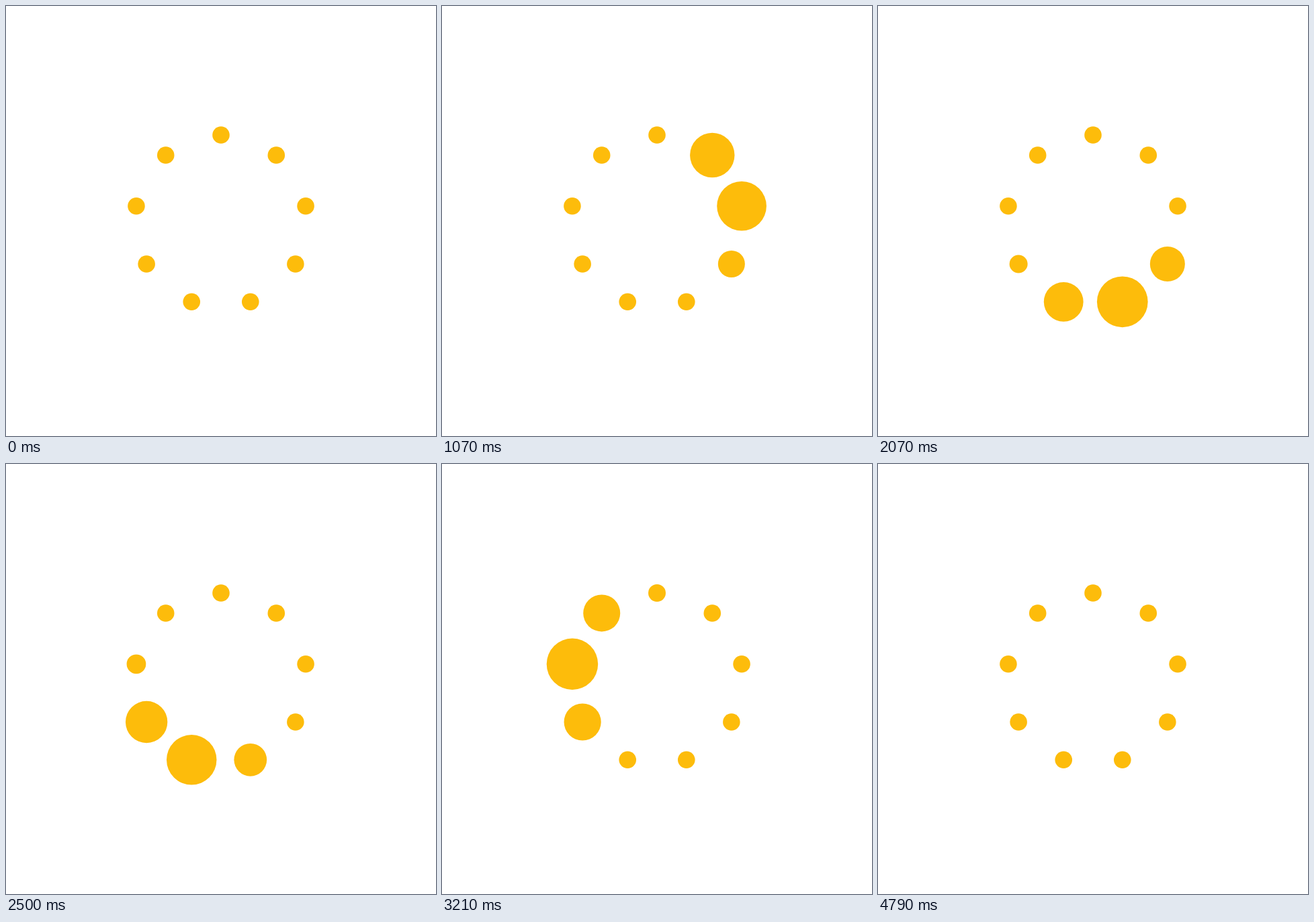
Write an HTML page that moves like this. It is 640 px wide and 640 px high and loops after 5210 ms.

```html
<!DOCTYPE html>
<html lang="en">
<head>
<meta charset="utf-8">
<title>Pulsing ring</title>
<style>
  html, body { margin: 0; width: 100%; height: 100%; overflow: hidden; background: #fff; }
  svg { display: block; width: 100%; height: 100%; }
  circle { fill: #fdbc0b; }
</style>
</head>
<body>
<svg viewBox="0 0 640 640"></svg>
<script>
const LOOP = 5210;          // ms
const COUNT = 9;
const CENTER = 320;
const RING = 128;
const SMALL = 12.8;
const BIG = 38.4;
const STAGGER = 10;         // ticks between neighbouring dots
const HALF = 20;            // ticks to grow, and again to shrink

const svg = document.querySelector('svg');
const dots = Array.from({ length: COUNT }, (_, i) => {
  const dot = document.createElementNS('http://www.w3.org/2000/svg', 'circle');
  const angle = (i + 1) * 2 * Math.PI / COUNT;
  dot.setAttribute('cx', CENTER + RING * Math.sin(angle));
  dot.setAttribute('cy', CENTER - RING * Math.cos(angle));
  dot.setAttribute('r', SMALL);
  return svg.appendChild(dot);
});

const easeInOut = x => x * x * (3 - 2 * x);

// cubic-bezier(1/3, 0, 5/6, 5/6)
function easeIn(x) {
  let lo = 0, hi = 1;
  const curveY = s => 2.5 * (1 - s) * s * s + s ** 3;
  for (let n = 0; n < 30; n++) {
    const s = (lo + hi) / 2;
    if ((1 - s) ** 2 * s + curveY(s) < x) lo = s; else hi = s;
  }
  return curveY(lo);
}

function pulse(tick) {
  if (tick <= 0 || tick >= 2 * HALF) return 0;
  const x = tick / HALF;
  return x <= 1 ? easeInOut(x) : 1 - easeIn(x - 1);
}

// The 25 Hz motion is shown at 14 pictures per second.
function tickAt(ms) {
  const step = Math.floor((Math.floor(ms / 10) + 0.5) * 0.14);
  return Math.floor(step * 25 / 14 + 0.9);
}

function draw(now) {
  const tick = tickAt(now % LOOP);
  dots.forEach((dot, i) => {
    dot.setAttribute('r', SMALL + (BIG - SMALL) * pulse(tick - i * STAGGER));
  });
  requestAnimationFrame(draw);
}
draw(performance.now());
</script>
</body>
</html>
```
